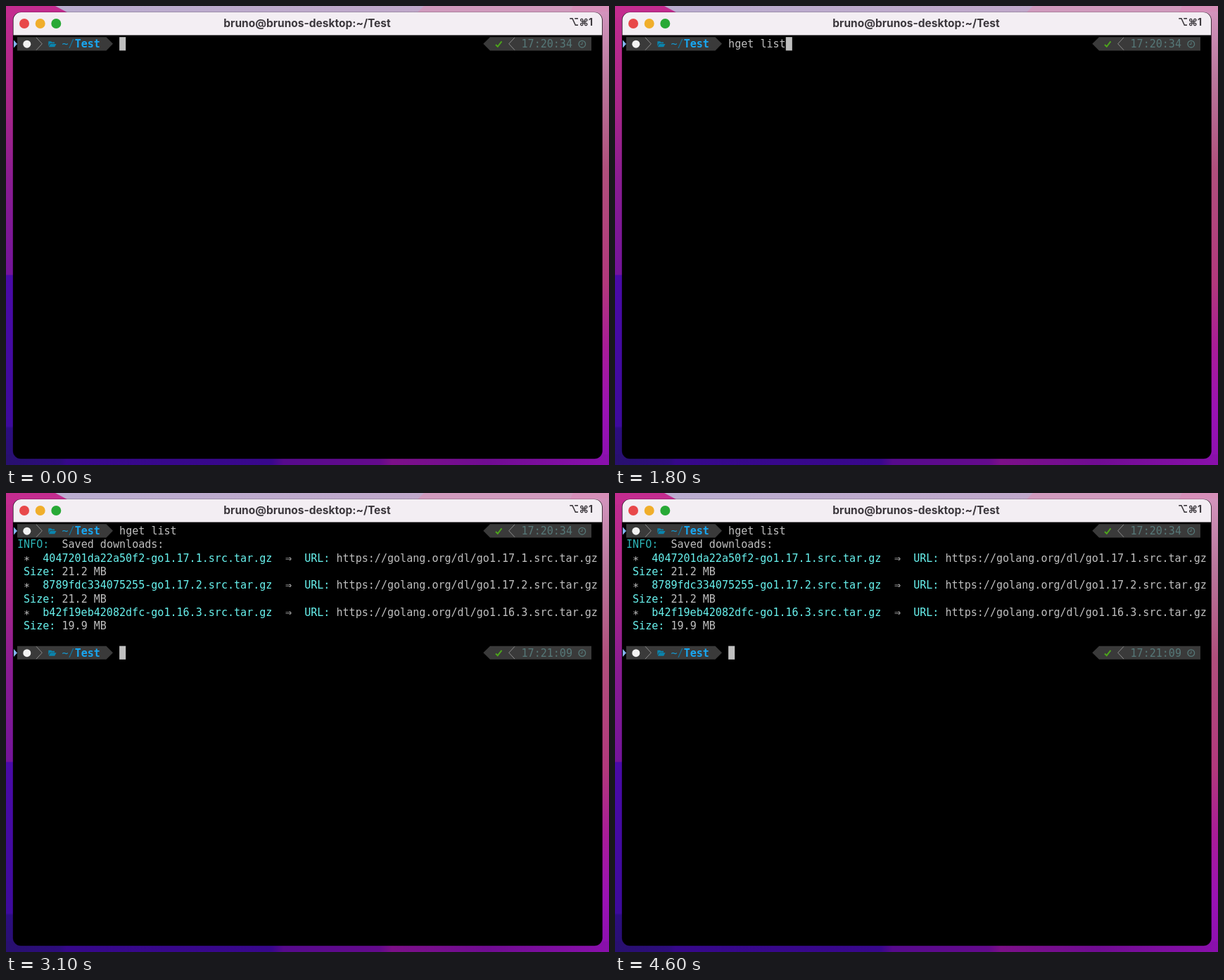
Animation, 857 px wide and 653 px high, one loop 4.7 s. Source, as an HTML page:

```html
<!DOCTYPE html>
<html lang="en">
<head>
<meta charset="utf-8">
<title>Terminal</title>
<style>
html, body { margin: 0; width: 100%; height: 100%; overflow: hidden; background: #000; }
svg { display: block; width: 857px; height: 653px; }
.mono { font: 15.06px "DejaVu Sans Mono", monospace; white-space: pre; }
.ui { font: 700 15.5px Inter, sans-serif; fill: #3b373c; }
</style>
</head>
<body>
<svg id="stage" viewBox="0 0 857 653" xmlns="http://www.w3.org/2000/svg">
  <defs>
    <linearGradient id="left" x2="0" y2="1">
      <stop offset="0" stop-color="#c32c8f"/>
      <stop offset=".22" stop-color="#a82689"/>
      <stop offset=".38" stop-color="#8a1c92"/>
      <stop offset=".585" stop-color="#74149a"/>
      <stop offset=".587" stop-color="#4a0aa8"/>
      <stop offset=".915" stop-color="#3d0a9c"/>
      <stop offset=".92" stop-color="#2c0d80"/>
      <stop offset="1" stop-color="#28106f"/>
    </linearGradient>
    <linearGradient id="right" x2="0" y2="1">
      <stop offset="0" stop-color="#d394bd"/>
      <stop offset=".15" stop-color="#b9779c"/>
      <stop offset=".35" stop-color="#b04f7c"/>
      <stop offset=".6" stop-color="#b2387c"/>
      <stop offset=".74" stop-color="#a91c98"/>
      <stop offset=".88" stop-color="#9a12b4"/>
      <stop offset="1" stop-color="#8c10b0"/>
    </linearGradient>
    <linearGradient id="top">
      <stop offset="0" stop-color="#b9add0"/>
      <stop offset="1" stop-color="#c3a6c8"/>
    </linearGradient>
    <linearGradient id="bottom">
      <stop offset="0" stop-color="#28106f"/>
      <stop offset=".09" stop-color="#2d0c7c"/>
      <stop offset=".1" stop-color="#36088a"/>
      <stop offset=".44" stop-color="#38078c"/>
      <stop offset=".46" stop-color="#560a8c"/>
      <stop offset=".62" stop-color="#640a8c"/>
      <stop offset=".64" stop-color="#7c1088"/>
      <stop offset=".8" stop-color="#700c92"/>
      <stop offset="1" stop-color="#8a10ac"/>
    </linearGradient>
  </defs>

  <rect width="857" height="20" fill="url(#top)"/>
  <path d="M594 0H857V20H574Z" fill="#d09abd"/>
  <path d="M806 0H857V20H796Z" fill="#d68fb9"/>
  <rect width="40" height="653" fill="url(#left)"/>
  <path d="M0 0H70L100 16H0Z" fill="#c32c8f"/>
  <rect x="830" y="8" width="27" height="645" fill="url(#right)"/>
  <rect y="638" width="857" height="15" fill="url(#bottom)"/>

  <rect x="10" y="9" width="837.5" height="635" rx="11" fill="#000" stroke="#000" stroke-opacity=".35"/>
  <path d="M10.5 41V20a11 11 0 0 1 11-11H836a11 11 0 0 1 11 11V41Z" fill="#f3eef3"/>
  <path d="M10.5 41.5H847" stroke="#777277"/>
  <circle cx="26" cy="25" r="7" fill="#e8484a"/>
  <circle cx="48.7" cy="25" r="7" fill="#f0ae2b"/>
  <circle cx="71.3" cy="25" r="7" fill="#28a936"/>
  <text class="ui" x="428" y="29.5" text-anchor="middle">bruno@brunos-desktop:~/Test</text>
  <text class="ui" x="834" y="28" text-anchor="end" style="font-size:14px">⌥⌘1</text>
  <g id="screen" class="mono"></g>
</svg>
<script>
const LOOP = 4700, COL = 9.07, ROW = 19.27;
const GREY = '#bfbfbf', CYAN = '#68f2ee', TEAL = '#2db4b6', BLUE = '#0b84ad';
const COMMAND = 'hget list';
const KEY_TIMES = [400, 500, 700, 1000, 1100, 1300, 1400, 1500, 1700];
const OUTPUT_TIME = 2200;
const screen = document.getElementById('screen');

const colX = c => 16 + c * COL;
const rowY = r => 44.2 + r * ROW;

function add(parent, tag, attrs, content = '') {
  const el = document.createElementNS('http://www.w3.org/2000/svg', tag);
  for (const key in attrs) el.setAttribute(key, attrs[key]);
  el.textContent = content;
  parent.append(el);
  return el;
}

function write(parent, col, row, content, fill = GREY, attrs = {}) {
  return add(parent, 'text', { x: colX(col), y: rowY(row) + 15, fill, ...attrs }, content);
}

function prompt(parent, row, clock) {
  const g = add(parent, 'g', { transform: `translate(0 ${rowY(row)})` });
  const path = (d, attrs) => add(g, 'path', { d, ...attrs });
  const thin = { fill: 'none', stroke: '#8d8d8d', 'stroke-width': 1 };
  path('M11 4.3L16 9.8L11 15.3Z', { fill: '#83b4ee' });
  path('M16 0H142.5L152 9.6L142.5 19.2H16Z', { fill: '#3a3a3a' });
  add(g, 'circle', { cx: 29.8, cy: 10, r: 5.5, fill: '#f2f2f2' });
  path('M43 .7L51.3 9.6L43 18.5', thin);
  path('M60.3 6H64.2L65.2 7.2H69V9H62.5L60.3 13Z M63 9.7H71.5L69.2 14H60.8Z', { fill: BLUE });
  path('M832 0H688L678.3 9.6L688 19.2H832Z', { fill: '#3a3a3a' });
  path('M696 10.8L698.8 13.6L704.5 6.2', { fill: 'none', stroke: '#4da51c', 'stroke-width': 2 });
  path('M723 .7L714.7 9.6L723 18.5', thin);
  add(g, 'circle', { cx: 818.8, cy: 10, r: 4.8, fill: 'none', stroke: '#567878', 'stroke-width': 1.3 });
  path('M819 7V10.4H816.4', { fill: 'none', stroke: '#567878' });
  write(parent, 7, row, '~', '#1598cf');
  write(parent, 8, row, '/', '#14739a');
  write(parent, 9, row, 'Test', '#18a8f3', { 'font-weight': 700 });
  write(parent, 79, row, clock, '#567878');
}

function download(parent, row, id, version, size) {
  const file = `go${version}.src.tar.gz`;
  write(parent, 1, row, '∗');
  write(parent, 4, row, `${id}-${file}`, CYAN);
  write(parent, 42, row, '⇒');
  write(parent, 45, row, 'URL:', CYAN);
  write(parent, 50, row, `https://golang.org/dl/${file}`);
  write(parent, 1, row + 1, 'Size:', CYAN);
  write(parent, 7, row + 1, `${size} MB`);
}

prompt(screen, 0, '17:20:34');
const typed = write(screen, 16, 0, '');
const output = add(screen, 'g', {});
write(output, 0, 1, 'INFO:', TEAL);
write(output, 7, 1, 'Saved downloads:');
download(output, 2, '4047201da22a50f2', '1.17.1', '21.2');
download(output, 4, '8789fdc334075255', '1.17.2', '21.2');
download(output, 6, 'b42f19eb42082dfc', '1.16.3', '19.9');
prompt(output, 9, '17:21:09');
const cursor = add(screen, 'rect', { width: COL, height: 19.2, fill: GREY });

function render(t) {
  const count = KEY_TIMES.filter(k => k <= t).length;
  const done = t >= OUTPUT_TIME;
  typed.textContent = COMMAND.slice(0, count);
  output.setAttribute('visibility', done ? 'visible' : 'hidden');
  cursor.setAttribute('x', colX(done ? 16 : 16 + count));
  cursor.setAttribute('y', rowY(done ? 9 : 0));
}

const start = performance.now();
function tick() {
  render((performance.now() - start) % LOOP);
  requestAnimationFrame(tick);
}
tick();
</script>
</body>
</html>
```
